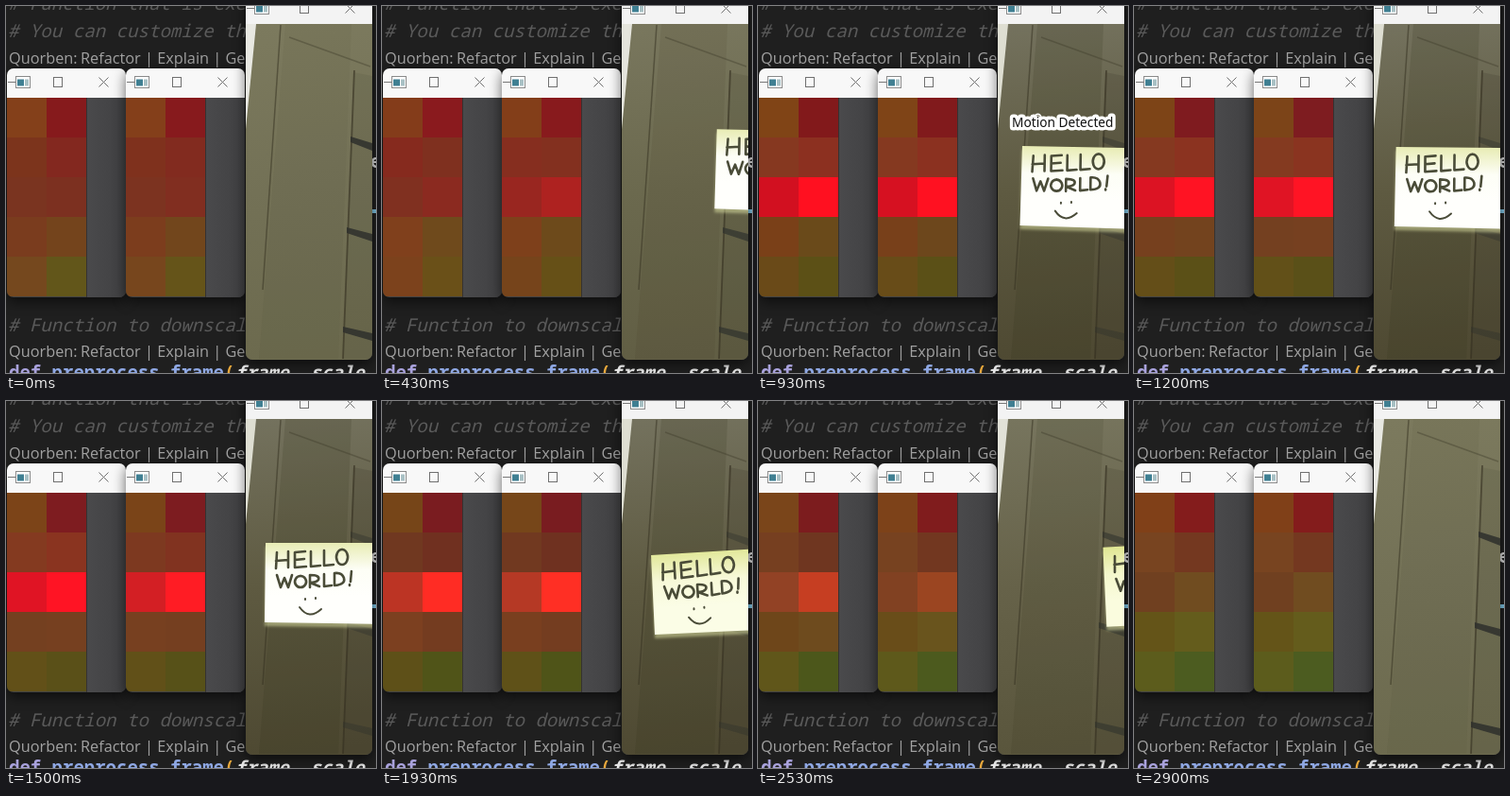
Recreate the animation shown at these times as an HTML page with a canvas. Size 392 by 388 pixels, loop 3 s.

```html
<!DOCTYPE html>
<html lang="en">
<head>
<meta charset="utf-8">
<title>Motion detection</title>
<style>
html, body { margin: 0; width: 100%; height: 100%; overflow: hidden; background: #1f1f1f; }
canvas { display: block; width: 392px; height: 388px; }
</style>
</head>
<body>
<canvas id="stage" width="392" height="388"></canvas>
<script>
const ctx = document.getElementById('stage').getContext('2d');
const LOOP = 3000, STEP = 100 / 3, LAST = 87;
const MONO = '"Noto Sans Mono", "DejaVu Sans Mono", monospace';
const SANS = '"Open Sans", "Noto Sans", sans-serif';

// Grid colours, row by row, two per row
const cellKeys = [
  [0, '84401a 861a1c 7c341c 83281f 7a3420 7c3020 7a3c1e 74441c 75481e 62561a'],
  [430, '843c1a 8a1a1e 862a1e 7f301f 7f3020 8a2a20 80401c 6f4a1c 7c421c 6a5018'],
  [930, '804416 82191b 863820 8c3020 d21020 ff1020 7a4018 6a4a1a 6a4a18 5c5016'],
  [1500, '7c4418 7e1c20 843a20 8a3420 e01424 ff1424 744020 764020 625018 5a5018'],
  [1930, '764518 7a1c20 703820 703020 bc3424 ff2c24 7c4020 743c20 5e5018 505418'],
  [2400, '76481c 761c20 743c20 6c3420 a84428 ff3424 743c1c 744020 625218 4c5418'],
  [2900, '804018 841c1c 784420 743820 704020 704c20 645418 645c1c 5c5c1c 4c5c20']
].map(([t, s]) => [t, s.split(' ').map(rgb)]);

// time, left, top, tilt in degrees
const cardKeys = [
  [330, 398, 126, 2], [430, 355, 130, 1], [600, 292, 145, 1], [930, 279, 148, 1],
  [1500, 274, 150, 0], [1930, 284, 163, -3.4], [2260, 288, 166, -4],
  [2420, 304, 163, -4], [2600, 400, 150, -3]
];
const dimKeys = [[0, 0], [330, .2], [430, .35], [600, .85], [930, 1],
  [2260, 1], [2480, .8], [2700, .15], [2900, 0]];

const lettering = new Path2D(
  'M13 10L12 27M25 9L25 26M12 19L25 18' +
  'M43 9L32 10L32 26L44 25M32 18L42 17' +
  'M49 9L49 25L59 24M63 8L63 24L73 23M82 7a6 8 0 1 0 .1 0' +
  'M13 34L17 47L21 37L25 47L29 34M38 35a6 6 0 1 0 .1 0' +
  'M48 47L48 34q11 0 9 5q-2 3-9 3L58 46M63 33L63 46L71 45' +
  'M74 32L74 45q12-1 10-8q-2-6-10-5M92 30L91 41M90 44v1');
const smile = new Path2D('M37 68q10 14 23 2M43 59v1M54 58v1');

function rgb(hex) {
  return [0, 2, 4].map(i => parseInt(hex.substr(i, 2), 16));
}
function mix(a, b, u) { return a.map((v, i) => v + (b[i] - v) * u); }
function css(c) { return `rgb(${c.map(Math.round).join(',')})`; }

function segment(t, keys) {
  let i = 0;
  while (i < keys.length - 2 && t >= keys[i + 1][0]) i++;
  const a = keys[i], b = keys[i + 1];
  return [a, b, Math.min(1, Math.max(0, (t - a[0]) / (b[0] - a[0])))];
}
function track(t, keys) {
  const [a, b, u] = segment(t, keys);
  return mix(a, b, u).slice(1);
}

function text(s, x, y, font, fill) {
  ctx.font = font;
  ctx.fillStyle = fill;
  ctx.fillText(s, x, y);
}
function box(x, y, w, h, fill) {
  ctx.fillStyle = fill;
  ctx.fillRect(x, y, w, h);
}
function poly(points, fill) {
  ctx.beginPath();
  points.forEach(([x, y]) => ctx.lineTo(x, y));
  ctx.fillStyle = fill;
  ctx.fill();
}
function line(x1, y1, x2, y2, color, width = 1) {
  ctx.strokeStyle = color;
  ctx.lineWidth = width;
  ctx.beginPath();
  ctx.moveTo(x1, y1);
  ctx.lineTo(x2, y2);
  ctx.stroke();
}
function ramp(x1, y1, x2, y2, ...colors) {
  const g = ctx.createLinearGradient(x1, y1, x2, y2);
  colors.forEach((c, i) => g.addColorStop(i / (colors.length - 1), c));
  return g;
}

function editor() {
  box(0, 0, 392, 388, '#1f1f1f');
  const comment = 'italic 19.1px ' + MONO;
  text('# Function that is exe', 2, 4, comment, '#5a5a5a');
  text('# You can customize th', 2, 33, comment, '#5a5a5a');
  text('# Function to downscal', 2, 344, comment, '#5a5a5a');
  for (const y of [61, 371]) {
    text('Quorben:', 3, y, '16.3px ' + SANS, '#a2a2a2');
    text('Refactor | Explain | Ge', 79, y, '16.3px ' + SANS, '#a2a2a2');
  }
  const code = 'bold 19px ' + MONO;
  text('def', 3, 394, code, '#a9a2dc');
  text('preprocess_frame', 48.6, 394, code, '#8fa8e4');
  text('(', 231, 394, code, '#e8a83c');
  text('frame, scale', 243, 394, 'italic ' + code, '#ececec');
  text('e', 386, 171, code, '#ddd');
  box(388, 215, 4, 4, '#7fc4e4');
}

function panel(x, y, w, h, bar, draw) {
  ctx.save();
  ctx.beginPath();
  ctx.roundRect(x, y, w, h, 7);
  ctx.shadowColor = 'rgba(0,0,0,.6)';
  ctx.shadowBlur = 14;
  ctx.shadowOffsetY = 4;
  ctx.fillStyle = '#444';
  ctx.fill();
  ctx.shadowColor = 'transparent';
  ctx.clip();
  box(x, y, w, 31, bar);
  draw();
  ctx.restore();

  const cy = y + 14.5, right = x + w;
  ctx.lineWidth = 1;
  ctx.strokeStyle = '#8a8a8a';
  ctx.fillStyle = '#fff';
  ctx.fillRect(x + 9, cy - 6, 15, 12);
  ctx.strokeRect(x + 9.5, cy - 6, 15, 12);
  box(x + 11, cy - 3, 7, 7, '#3f7f92');
  box(x + 19, cy - 3, 4, 7, '#a8c0c4');
  line(x + 1, cy, x + 9, cy, '#777');
  ctx.strokeStyle = '#707070';
  ctx.strokeRect(right - 76.5, cy - 5, 9, 10);
  line(right - 28.5, cy - 5, right - 18.5, cy + 5, '#707070');
  line(right - 18.5, cy - 5, right - 28.5, cy + 5, '#707070');
}

function grid(x, t) {
  const [a, b, u] = segment(t, cellKeys);
  const v = Math.min(1, u * 1.5);
  panel(x, 66, 126, 242, '#f8f8f8', () => {
    box(x + 84, 97, 42, 211, ramp(x + 84, 0, x + 126, 0, '#4a4a4c', '#404042'));
    for (let i = 0; i < 10; i++) {
      const left = x + i % 2 * 42, top = 97 + (i >> 1) * 42;
      box(left, top, 42, 42, css(mix(a[1][i], b[1][i], v)));
    }
    line(x + 84.5, 97, x + 84.5, 308, 'rgba(40,36,34,.6)');
  });
}

function room(dim) {
  const lit = 1 - dim;
  const top = css(mix([124, 122, 94], [116, 114, 94], dim));
  const mid = css(mix([115, 113, 86], [94, 90, 65], dim));
  const low = css(mix([108, 106, 78], [78, 73, 50], dim));
  box(254, 19, 134, 355, ramp(254, 19, 290, 373, top, mid, low));

  // Inner door panel and the frame beside it
  poly([[296, 19], [366, 19], [352, 373], [268, 373]], `rgba(52,48,28,${.05 + .12 * dim})`);
  poly([[368, 70], [388, 74], [388, 373], [357, 373]], `rgba(60,58,42,${.12 + .1 * dim})`);
  line(291, 20, 272, 300, 'rgba(50,46,30,.5)', 1.5);
  line(300, 33, 386, 64, 'rgba(62,58,40,.4)', 1.5);
  line(369, 68, 357, 373, 'rgba(52,48,32,.6)', 1.8);

  const slot = `rgba(46,48,44,${.4 + .45 * lit})`;
  for (const [x, y] of [[365, 138], [361, 234], [357, 339]])
    poly([[x, y], [388, y + 7], [388, y + 15], [x, y + 6]], slot);

  poly([[254, 19], [265, 19], [254, 130]], css(mix([232, 232, 226], [222, 222, 210], dim)));
}

function card(t) {
  const [x, y, tilt] = track(t, cardKeys);
  if (x > 392) return;
  const warm = Math.min(1, Math.max(0, (t - 1500) / 600));
  const edge = css(mix([232, 236, 180], [224, 230, 146], warm));
  const mid = css(mix([253, 254, 246], [244, 247, 204], warm));
  const low = css(mix([255, 255, 252], [250, 252, 222], warm));
  ctx.save();
  ctx.translate(x, y);
  ctx.rotate(tilt * Math.PI / 180);
  ctx.shadowColor = 'rgba(230,235,170,.5)';
  ctx.shadowBlur = 3;
  poly([[1, 0], [135, 0], [135, 86], [70, 85], [0, 84]], ramp(0, 0, 0, 85, edge, mid, low, low));
  ctx.shadowColor = 'transparent';
  ctx.lineCap = ctx.lineJoin = 'round';
  ctx.strokeStyle = '#4a4c38';
  ctx.lineWidth = 2.6;
  ctx.stroke(lettering);
  ctx.lineWidth = 2;
  ctx.stroke(smile);
  ctx.restore();
}

function camera(t) {
  panel(254, -12, 134, 386, '#f3f3f3', () => {
    ctx.beginPath();
    ctx.rect(254, 19, 134, 355);
    ctx.clip();
    room(track(t, dimKeys)[0]);
    card(t);
  });
}

function label() {
  ctx.save();
  ctx.font = '13.7px "Noto Sans", "Open Sans", sans-serif';
  ctx.lineJoin = 'round';
  ctx.lineWidth = 7;
  ctx.strokeStyle = '#fff';
  ctx.strokeText('Motion Detected', 269, 128);
  ctx.fillStyle = '#111';
  ctx.fillText('Motion Detected', 269, 128);
  ctx.restore();
}

function draw(t) {
  editor();
  grid(1, t);
  grid(127, Math.min(2900, t + 100));
  camera(t);
  if (t >= 565 && t < 1100) label();
}

const start = performance.now();
function tick() {
  const ms = (performance.now() - start) % LOOP;
  const step = Math.floor((Math.floor(ms / 10) * 10 + 9.99) / STEP);
  draw(Math.min(LAST, step) * STEP);
  requestAnimationFrame(tick);
}
tick();
</script>
</body>
</html>
```
